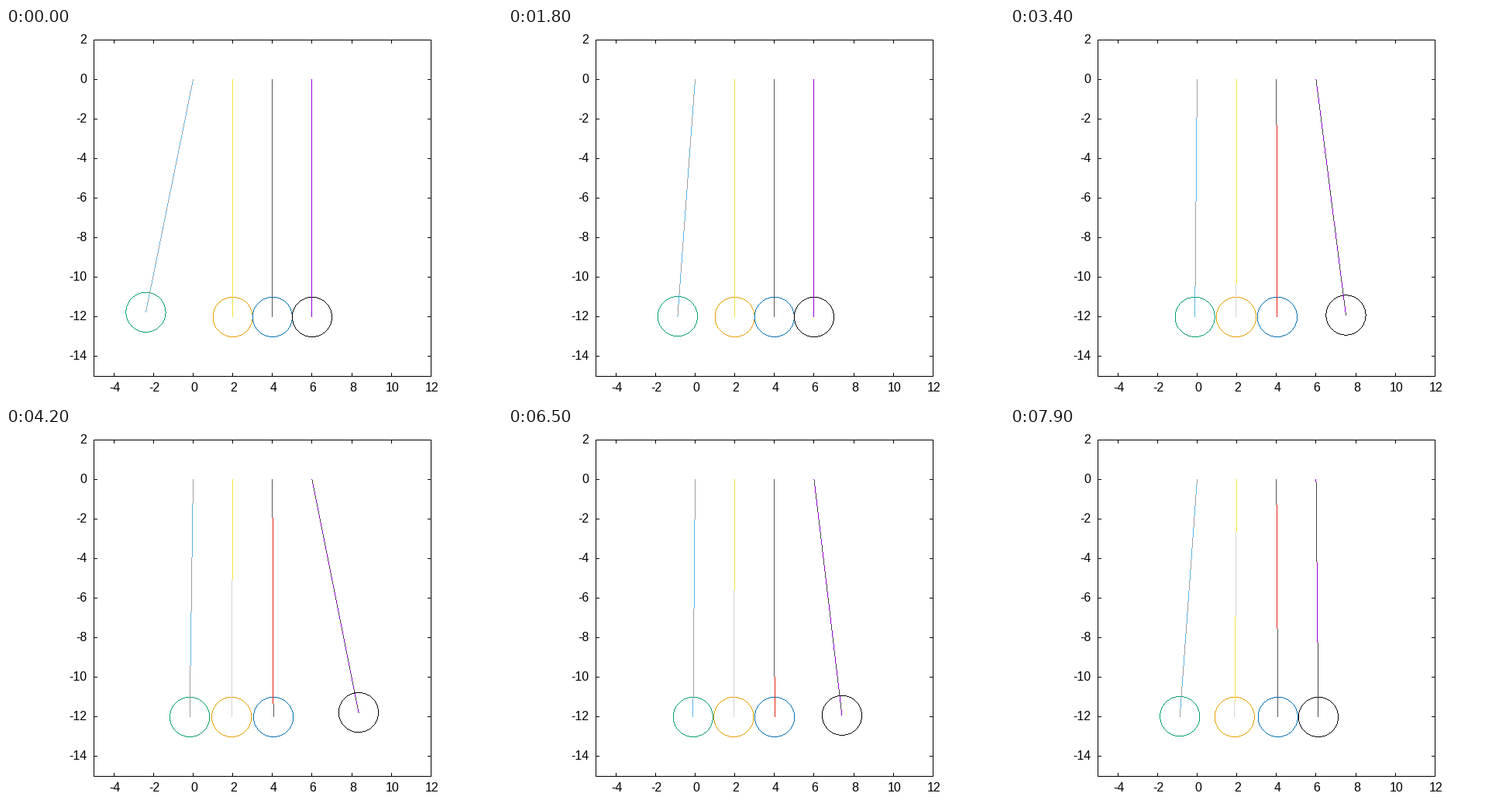
Animation, 640 px wide and 480 px high, one loop 8 s. Source, as a matplotlib script:

```python
import numpy as np
import matplotlib.pyplot as plt
from matplotlib.animation import FuncAnimation
from matplotlib.collections import LineCollection
from matplotlib.colors import to_rgb

W, H, DPI = 640, 480, 100
FRAMES, INTERVAL = 80, 100
LEFT, RIGHT, TOP, BOTTOM = 113, 548, 15, 449
LENGTH, RADIUS = 12, 1
OMEGA = 0.631

PIVOTS = [0, 2, 4, 6]
BALLS = ["#009e73", "#e69f00", "#0072b2", "#000000"]
ROPES = ["#56b4e9", "#f0e442", "#e51e10", "#9400d3"]

# Between collisions each ball swings as amp * sin(OMEGA * (t - t0)).
STAGES = [
    (0.00, [(2.388, 2.399), (0, 0), (0, 0), (0, 0)]),
    (2.41, [(-0.191, 2.43), (-0.073, 2.777), (0.05, 1.83), (2.605, 2.425)]),
    (7.41, [(-2.85, 7.41), (-0.36, 7.41), (0.246, 7.41), (0.38, 7.41)]),
]


def px(x):
    return LEFT + (x + 5) * (RIGHT - LEFT) / 17


def py(y):
    return TOP + (2 - y) * (BOTTOM - TOP) / 17


def pixels(x, y):
    """One-pixel horizontal segments centred on the rounded points."""
    x, y = np.rint(x), np.rint(y)
    return np.stack([np.column_stack([x - 0.5, y]),
                     np.column_stack([x + 0.5, y])], axis=1)


def circle(cx, cy, r):
    h = r / np.sqrt(2)
    c = np.arange(np.floor(cx - h), np.ceil(cx + h) + 1)
    d = np.arange(np.floor(cy - h), np.ceil(cy + h) + 1)
    dy = np.sqrt(r * r - (c - cx) ** 2)
    dx = np.sqrt(r * r - (d - cy) ** 2)
    return pixels(np.concatenate([c, c, cx - dx, cx + dx]),
                  np.concatenate([cy - dy, cy + dy, d, d]))


def rope(x0, y0, x1, y1):
    y = np.arange(np.rint(y0), np.rint(y1) + 1)
    return pixels(x0 + (x1 - x0) * (y - y0) / (y1 - y0), y)


def rope_colors(segs, color):
    """Full colour on even pixel columns, its grey value on odd ones."""
    rgb = np.array(to_rgb(color))
    grey = np.full(3, rgb @ [0.299, 0.587, 0.114])
    odd = (segs[:, 0, 0] + 0.5) % 2 == 1
    return np.where(odd[:, None], grey, rgb)


def crisp(segs, colors):
    lines = LineCollection(segs, colors=colors, linewidths=72 / DPI,
                           antialiaseds=False, capstyle="butt")
    lines.set_snap(False)
    return ax.add_collection(lines, autolim=False)


fig = plt.figure(figsize=(W / DPI, H / DPI), dpi=DPI, facecolor="white")
ax = fig.add_axes([0, 0, 1, 1])
ax.set_xlim(-0.5, W - 0.5)
ax.set_ylim(H - 0.5, -0.5)
ax.axis("off")


def draw_frame():
    l, r, t, b = LEFT - 0.5, RIGHT + 0.5, TOP - 0.5, BOTTOM + 0.5
    segs = [[(l, TOP), (r, TOP)], [(l, BOTTOM), (r, BOTTOM)],
            [(LEFT, t), (LEFT, b)], [(RIGHT, t), (RIGHT, b)]]
    font = dict(family="Liberation Sans", size=16 * 72 / DPI, va="baseline")
    for v in range(-4, 13, 2):
        x = np.rint(px(v))
        segs += [[(x, t), (x, t + 5)], [(x, b - 5), (x, b)]]
        ax.text(px(v) + 1.2, 468.5, str(v), ha="center", **font)
    for v in range(-14, 3, 2):
        y = np.rint(py(v))
        segs += [[(l, y), (l + 5, y)], [(r - 5, y), (r, y)]]
        ax.text(104, y + 4.5, str(v), ha="right", **font)
    crisp(segs, "black")


draw_frame()
cradle = crisp([], "black")


def update(i):
    t = i * INTERVAL / 1000
    swings = [s for start, s in STAGES if t >= start][-1]
    segs, colors = [], []
    for x0, (amp, t0), ball, string in zip(PIVOTS, swings, BALLS, ROPES):
        dx = amp * np.sin(OMEGA * (t - t0))
        cx, cy = px(x0 + dx), py(-np.sqrt(LENGTH ** 2 - dx ** 2))
        ring = circle(cx, cy, px(RADIUS) - px(0))
        line = rope(px(x0), py(0), cx, cy)
        segs += [ring, line]
        colors += [np.tile(to_rgb(ball), (len(ring), 1)),
                   rope_colors(line, string)]
    cradle.set_segments(np.concatenate(segs))
    cradle.set_color(np.concatenate(colors))
    return [cradle]


anim = FuncAnimation(fig, update, frames=FRAMES, interval=INTERVAL,
                     init_func=lambda: update(0), repeat=True, repeat_delay=0)
plt.show()
```
